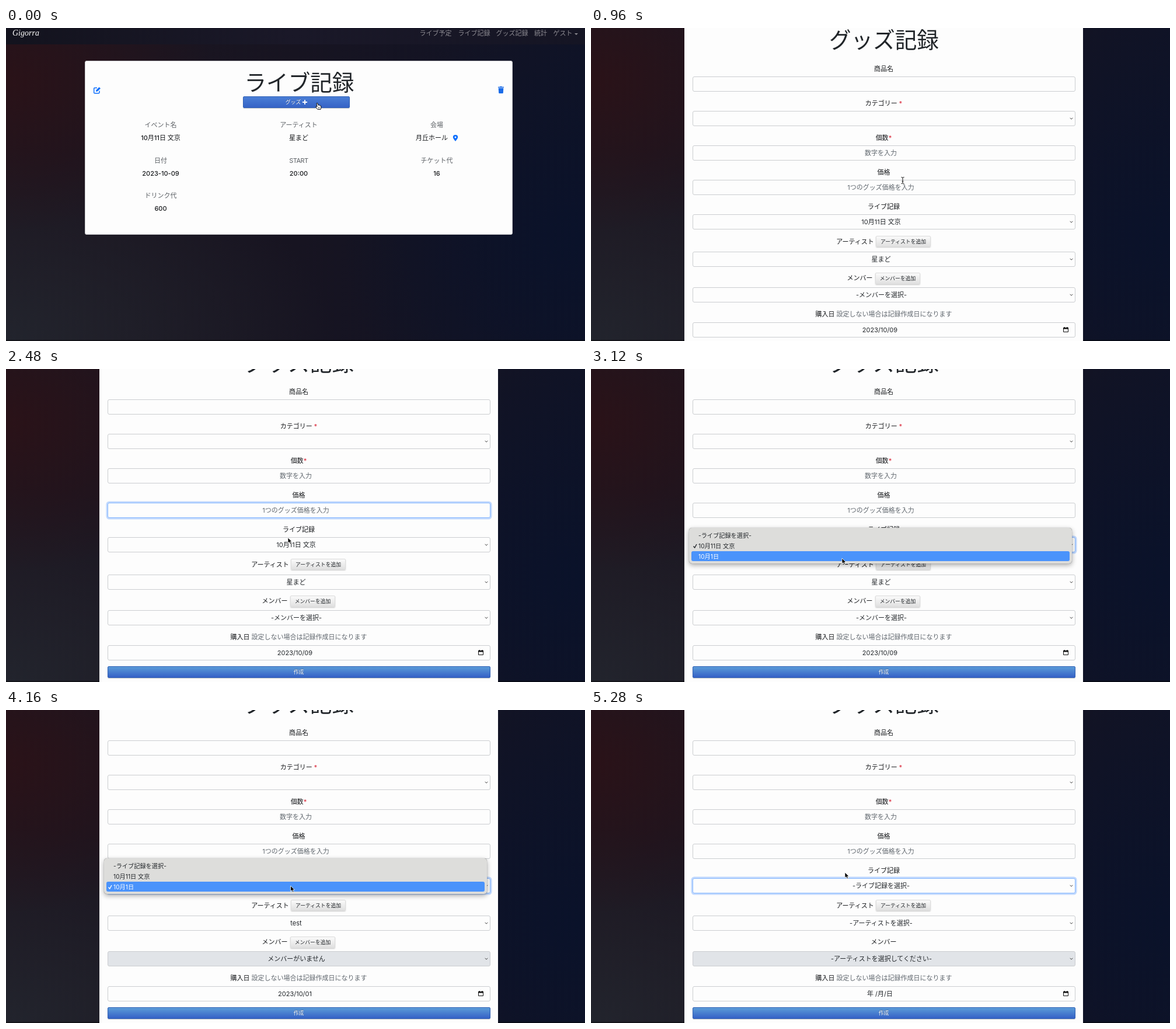
Animation of 992x536 px, one loop 5440 ms. Source, as an HTML page:

```html
<!DOCTYPE html>
<html lang="ja">
<head>
<meta charset="utf-8">
<title>ライブ記録</title>
<style>
html, body { margin: 0; width: 100%; height: 100%; overflow: hidden; }
body { background: #14121b; }
#stage {
  position: relative; width: 992px; height: 536px; overflow: hidden;
  font: 11px Inter, "Noto Sans CJK JP", "Noto Sans CJK", sans-serif; color: #212529;
  background:
    linear-gradient(#0000 534px, #0006 534px),
    radial-gradient(ellipse 360px 260px at 0 90px, #2a1218 0, #2a121800 100%),
    radial-gradient(ellipse 560px 330px at 0 536px, #22242d 0, #22242d00 100%),
    radial-gradient(ellipse 420px 380px at 992px 360px, #0a122a 0, #0a122a00 100%),
    linear-gradient(90deg, #1d1620, #171421 50%, #101326);
}
#stage div, #stage svg { position: absolute; box-sizing: border-box; }
#stage svg { overflow: visible; }
.page { left: 0; top: 0; width: 992px; height: 536px; }
.nav { left: 0; top: 0; width: 992px; height: 28px; background: linear-gradient(90deg, #13131e, #1a1828 50%, #151524); }
.t { width: 400px; line-height: 20px; text-align: center; white-space: nowrap; }
.link { color: #8d8b92; }
.brand { width: auto; color: #fff; font: italic 14px/20px "Liberation Serif", serif; }
.caret { left: 974px; top: 9px; border: 3px solid #0000; border-top-color: #8d8b92; border-bottom: 0; }
.card { background: #fdfdfd; }
.card.framed { border: 1px solid #c8c8cb; border-radius: 3px; }
.title { font-size: 37.6px; }
.strong { font-weight: 500; color: #16181b; }
.gray { color: #5c6065; }
.hint { color: #60676e; font-weight: 400; }
.red { color: #dc3545; }
.small { font-size: 8.8px; }
.blue {
  border: 1px solid #2f5fb5; border-radius: 2px; box-shadow: 0 1px 1px #0003;
  background: linear-gradient(#5b9bd8, #3561c6);
}
.blue.deep { background: linear-gradient(#4a7ed6, #3663c6); }
.white { color: #fff; text-shadow: 0 -1px 0 #0005; }
.add {
  border: 1px solid #dcdcdc; border-radius: 2px; box-shadow: 0 1px 2px #0003;
  background: linear-gradient(#fafafa, #e0e0e0);
}
.field { left: 174px; width: 656px; height: 26px; border: 1px solid #cbcdd0; border-radius: 3px; background: #fdfdfd; }
.field.focus { border-color: #86b7fe; box-shadow: 0 0 0 2.5px #0d6efd40; }
.field.off { background: #e1e4e8; }
#spin { left: 810px; top: 235px; width: 10px; height: 14px; border-radius: 2px; background: #e6e6e6; }
#caret { left: 496px; top: 236px; width: 1px; height: 12px; background: #222; }
#menu {
  left: 168px; width: 656px; height: 61px; border-radius: 5px; font-size: 10.2px;
  background: #dddddb; box-shadow: 0 0 1px #0009, 0 3px 8px #0005;
}
#hl { left: 4px; width: 648px; height: 17px; border-radius: 3px; background: #4a93fb; }
#menu .item { left: 16px; line-height: 18px; white-space: nowrap; }
#menu .on { color: #fff; }
</style>
</head>
<body>
<div id="stage"></div>
<script>
const LOOP = 5440, STEP = 80;
const DROP = 104; // scroll distance from page top to the final rest

const text = (x, y, s, cls = '', id = '') =>
  `<div class="t ${cls}" id="${id}" style="left:${x - 200}px;top:${y - 10}px">${s}</div>`;
const rect = (cls, x, y, w, h) =>
  `<div class="${cls}" style="left:${x}px;top:${y}px;width:${w}px;height:${h}px"></div>`;
const svg = (x, y, body, id = '') =>
  `<svg id="${id}" width="1" height="1" style="left:${x}px;top:${y}px" fill="none">${body}</svg>`;
const label = (x, y, s, id) => text(x, y, s, 'strong', id);
const field = (y, id = '') => `<div class="field" id="${id}" style="top:${y - 13}px"></div>`;
const chevron = y => svg(823, y, '<path d="M-2.3-1.2 0 1.2 2.3-1.2" stroke="#444"/>');

const nav = '<div class="nav"></div>'
  + '<div class="t brand" style="left:11px;top:-1px">Gigorra</div>'
  + [[736, 'ライブ予定'], [802, 'ライブ記録'], [867, 'グッズ記録'], [916, '統計'], [954, 'ゲスト']]
    .map(([x, s]) => text(x, 9, s, 'link')).join('')
  + '<div class="caret"></div>';

const pair = (x, y, name, value, shift = 0) => text(x, y, name, 'gray') + label(x - shift, y + 22, value);

const record = nav
  + rect('card framed', 135, 56, 733, 298)
  + text(502.5, 94, 'ライブ記録', 'title')
  + rect('blue deep', 406, 117, 183, 20)
  + text(492, 126.5, 'グッズ', 'white small')
  + svg(511.5, 126.5, '<path d="M-4 0H4M0-4V4" stroke="#fff" stroke-width="1.8"/>')
  + svg(150, 101, '<path d="M6 1.5H2Q.7 1.5.7 2.8V9.5Q.7 10.8 2 10.8H8.7Q10 10.8 10 9.5V6.5" stroke="#0d6efd" stroke-width="1.5"/>'
    + '<path d="M4 8 4.5 5.3 9.6.2 12 2.6 6.8 7.6Z" fill="#0d6efd"/>')
  + svg(843, 100, '<path d="M0 .8H3L3.6 0H6.4L7 .8H10V2.3H0ZM.7 3H9.3L8.8 11Q8.7 12 7.8 12H2.2Q1.3 12 1.2 11Z" fill="#1a6be8"/>')
  + pair(265, 166, 'イベント名', '10月11日 文京')
  + pair(501.5, 166, 'アーティスト', '星まど')
  + pair(738, 166, '会場', '月丘ホール', 8.5)
  + svg(769.5, 183, '<path fill-rule="evenodd" d="M0 11Q-4.2 6-4.2 4A4.2 4 0 0 1 4.2 4Q4.2 6 0 11ZM-1.5 4A1.5 1.5 0 0 0 1.5 4 1.5 1.5 0 0 0-1.5 4Z" fill="#0d6efd"/>')
  + pair(265, 226.5, '日付', '2023-10-09')
  + pair(501.5, 226.5, '<span style="letter-spacing:-.5px">START</span>', '20:00')
  + pair(738, 226.5, 'チケット代', '16')
  + pair(265, 287, 'ドリンク代', '600');

const form = `<div style="left:0;top:${-DROP}px">${nav}</div>`
  + rect('card', 160, -48, 683, 700)
  + text(502, -10, 'グッズ記録', 'title')
  + label(501.5, 38.7, '商品名') + field(65)
  + label(501.5, 97.7, 'カテゴリー <span class="red">*</span>') + field(124) + chevron(124)
  + label(501.5, 156.7, '個数<span class="red">*</span>') + field(183) + text(496.5, 183, '数字を入力', 'hint')
  + label(501.5, 215.7, '価格') + field(242, 'price') + text(496.5, 242, '1つのグッズ価格を入力', 'hint')
  + '<div id="spin"></div><div id="caret"></div>'
  + svg(815, 242, '<path d="M-2.5-1.5H2.5L0-5ZM-2.5 1.5H2.5L0 5Z" fill="#333"/>', 'arrows')
  + label(501.5, 274.7, 'ライブ記録') + field(301, 'live') + text(497, 301, '', '', 'liveText') + chevron(301)
  + label(452.5, 335, 'アーティスト') + rect('add', 488, 325, 94, 19) + text(535, 334.5, 'アーティストを追加', 'small')
  + field(364.5) + text(497, 364.5, '', '', 'artistText') + chevron(364.5)
  + label(460.5, 397, 'メンバー', 'memberLabel')
  + `<div id="memberAdd">${rect('add', 487, 388, 77, 20)}${text(525.5, 398, 'メンバーを追加', 'small')}</div>`
  + field(426, 'member') + text(497.5, 426, '', '', 'memberText') + chevron(426)
  + label(501.5, 458.5, '購入日 <span class="hint">設定しない場合は記録作成日になります</span>')
  + field(485.5) + text(495, 485.5, '', '', 'dateText')
  + svg(809, 481, '<path d="M.5 1.5H8.5V8.5H.5Z" stroke="#111"/><path d="M0 1H9V3.5H0ZM1.5 0H3V1H1.5ZM6 0H7.5V1H6Z" fill="#111"/>')
  + rect('blue', 173.5, 509, 656, 20) + text(501.5, 519, '作成', 'white small');

const events = ['-ライブ記録を選択-', '10月11日 文京', '10月1日'];
const menu = '<div id="menu"><div id="hl"></div>'
  + events.map((s, i) => `<div class="item" style="top:${3.5 + 18 * i}px">${s}</div>`).join('')
  + svg(7, 0, '<path d="M.5 .5 2.7 3 6-3" stroke="currentColor" stroke-width="1.4"/>', 'check') + '</div>';

const pointers = svg(0, 0, '<path d="M0 0V9.5L2.2 7.5 3.8 11 5.5 10.2 4 7H7Z" fill="#000" stroke="#fff" stroke-width=".8"/>', 'arrow')
  + svg(0, 0, '<path d="M-2.5-5.5Q0-5.5 0-4.3 0-5.5 2.5-5.5M0-4.5V4.5M-2.5 5.5Q0 5.5 0 4.3 0 5.5 2.5 5.5M-1.3 1.5H1.3" stroke="#111"/>', 'beam')
  + svg(0, 0, '<path d="M-3-5Q-2-6-1-5L0-1.8Q1-2.5 1.8-1.6 2.8-2 3.3-1.1 4.5-1.2 4.7 0L4.8 2.5 4 5.5H-1L-4.2 1.2Q-4.5-.2-3.2 0L-1.9.9Z" fill="#fff" stroke="#000" stroke-width=".9"/><path d="M.5 1.5V4M2 1.5V4" stroke="#000" stroke-width=".6"/>', 'hand');

const stage = document.getElementById('stage');
stage.innerHTML = `<div class="page" id="record">${record}</div><div class="page" id="form">${form}</div>${menu}${pointers}`;

const $ = id => document.getElementById(id);
const show = (id, on) => { $(id).style.visibility = on ? 'visible' : 'hidden'; };
const items = [...document.querySelectorAll('#menu .item')];

// Field values for each chosen event, listed in menu order
const values = [
  { artist: '-アーティストを選択-', member: '-アーティストを選択してください-', date: '年 /月/日' },
  { artist: '星まど', member: '-メンバーを選択-', date: '2023/10/09' },
  { artist: 'test', member: 'メンバーがいません', date: '2023/10/01' },
];

const path = [
  [0, 535, 134], [400, 535, 135], [640, 534, 261], [1120, 534, 261], [1680, 526, 257],
  [1840, 522, 249], [2240, 522, 249], [2560, 470, 302], [2800, 440, 306], [3040, 430, 324],
  [3280, 430, 324], [3520, 554, 313], [3760, 556, 313], [3920, 540, 304], [4240, 470, 300],
  [4720, 411, 271], [4800, 410, 270], [4960, 411, 270], [5280, 435, 278], [LOOP, 435, 278],
];
const scrolls = [[0, 104], [560, 104], [720, 88], [960, 31], [1040, 11], [1120, 0], [LOOP, 0]];
const shapes = [[0, 'hand'], [400, 'arrow'], [560, 'beam'], [2400, 'arrow'], [3600, 'beam'], [3840, 'arrow']];

function at(keys, t) {
  const i = keys.findIndex(k => k[0] > t), a = keys[i - 1], b = keys[i];
  const p = (t - a[0]) / (b[0] - a[0]);
  return a.slice(1).map((v, n) => v + (b[n + 1] - v) * p);
}

function draw(t) {
  const within = (a, b) => t >= a && t < b;
  const onForm = t >= 400;
  $('record').style.display = onForm ? 'none' : 'block';
  $('form').style.display = onForm ? 'block' : 'none';
  $('form').style.top = Math.round(at(scrolls, t)[0]) + 'px';

  const [x, y] = at(path, t);
  const shape = shapes.filter(s => s[0] <= t).pop()[1];
  for (const id of ['arrow', 'beam', 'hand']) {
    show(id, id === shape);
    $(id).style.transform = `translate(${x}px, ${y}px)`;
  }

  const typing = within(1840, 2560);
  $('price').classList.toggle('focus', typing);
  show('caret', typing && t < 2320);
  show('spin', within(1760, 2400));
  show('arrows', within(1760, 2400));
  $('live').classList.toggle('focus', t >= 2560);

  const pick = t < 3440 ? 1 : t < 5120 ? 2 : 0;
  const v = values[pick];
  $('liveText').textContent = events[pick];
  $('artistText').textContent = v.artist;
  $('memberText').textContent = v.member;
  $('dateText').textContent = v.date;
  $('member').classList.toggle('off', pick !== 1);
  $('memberAdd').style.display = pick ? 'block' : 'none';
  $('memberLabel').style.left = (pick ? 260.5 : 301.5) + 'px';

  // The list opens with the chosen row lying over the field
  const open = within(2560, 3360) || within(3920, 5040);
  $('menu').style.display = open ? 'block' : 'none';
  if (!open) return;
  const top = 290 - 18 * pick;
  const blink = within(3200, 3280) || within(4880, 4960);
  const row = blink ? -1 : Math.floor((y - top - 4) / 18);
  $('menu').style.top = top + 'px';
  $('hl').style.top = 4 + 18 * row + 'px';
  show('hl', row >= 0);
  items.forEach((el, i) => el.classList.toggle('on', i === row));
  $('check').style.top = 12.5 + 18 * pick + 'px';
  $('check').style.color = row === pick ? '#fff' : '#212529';
}

const start = performance.now();
function tick() {
  const t = (performance.now() - start) % LOOP;
  draw(Math.floor(t / STEP) * STEP);
  requestAnimationFrame(tick);
}
tick();
</script>
</body>
</html>
```
